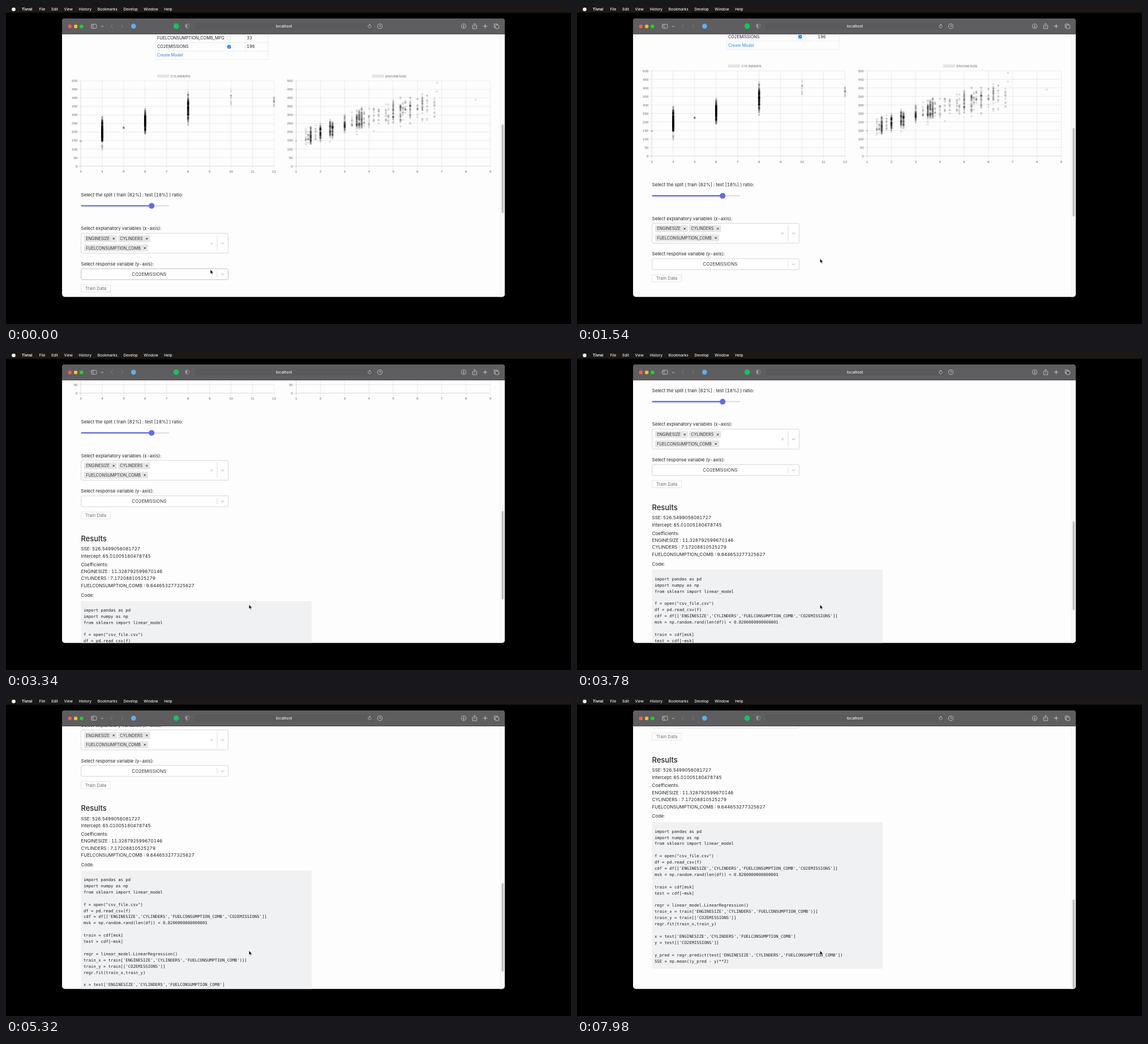
Animation of 998x561 px, one loop 8 s. Source, as an HTML page:

```html
<!DOCTYPE html>
<html lang="en">
<head>
<meta charset="utf-8">
<style>
  html, body { margin: 0; width: 100%; height: 100%; overflow: hidden; background: #000; }
  svg { display: block; width: 100%; height: 100%; font-family: Inter, sans-serif; font-variant-numeric: tabular-nums; }
  .chart { font-family: "Liberation Sans", Arial, sans-serif; }
  .code { font-family: "DejaVu Sans Mono", monospace; }
</style>
</head>
<body>
<svg id="stage" viewBox="0 0 998 561"></svg>
<script>
// y is the middle of the capitals
const text = (x, y, str, size = 8, fill = '#212529', more = '') =>
  `<text x="${x}" y="${y + size * 0.36}" font-size="${size}" fill="${fill}" ${more}>${str}</text>`;
const lines = (x, y, step, str, size, fill) =>
  str.split('\n').map((s, i) => text(x, y + i * step, s, size, fill)).join('');
const rect = (x, y, w, h, fill, more = '') =>
  `<rect x="${x}" y="${y}" width="${w}" height="${h}" fill="${fill}" ${more}/>`;
const line = (d, stroke, width = 0.8) =>
  `<path d="${d}" fill="none" stroke="${stroke}" stroke-width="${width}"/>`;
const dot = (x, y, r, fill) => `<circle cx="${x}" cy="${y}" r="${r}" fill="${fill}"/>`;
const cross = (x, y, r, color, width) =>
  line(`M${x - r} ${y - r}l${2 * r} ${2 * r}m0 ${-2 * r}l${-2 * r} ${2 * r}`, color, width);
const MID = 'text-anchor="middle"', END = 'text-anchor="end"';

let seed = 11;
const rnd = () => (seed = seed * 16807 % 2147483647) / 2147483647;

// n bell-shaped values around a mean, all at the same x
const column = (x, mean, spread, n) => Array.from({ length: n }, () =>
  [x, Math.round(mean + spread * (rnd() + rnd() + rnd() - 1.5) / 1.5)]);

const cylinders = [
  column(3, 146, 0, 2), column(4, 200, 108, 320), column(5, 226, 8, 6), column(6, 262, 98, 250),
  column(8, 338, 112, 200), column(10, 400, 95, 8), column(12, 382, 42, 12)
].flat();

const trend = x => 90 + 60 * x - 3 * x * x;
const bySize = (sizes, count) => sizes.flatMap(x => column(x, trend(x), 60 + 8 * x, count(x)));
const engines = [
  ...bySize([1.6, 2, 2.4, 2.5, 3, 3.5, 3.6, 3.7, 5, 5.3, 5.7, 6.2], x => 85 - 9 * x),
  ...bySize([1.4, 1.5, 1.8, 2, 3.3, 3.8, 4, 4.2, 4.4, 4.7, 4.8, 5.4, 5.5, 6, 6.4, 6.7], () => 12),
  [1, 148], [8.4, 389], [6.8, 488], [6.8, 437]
];

function chart(label, left, right, from, to, legend, points) {
  const step = (right - left) / (to - from);
  const X = v => left + (v - from) * step, Y = v => 282.4 - v * 0.3008;
  const shade = first => first ? 'rgba(0,0,0,.2)' : 'rgba(0,0,0,.1)';
  let out = rect(legend, 120.8, 21, 5.6, '#e5e5e5') + text(legend + 23.6, 123.6, label, 6.1, '#666');
  for (let v = 0; v <= 500; v += 50) {
    out += line(`M${left - 5} ${Y(v)}H${right}`, shade(v === 0), 0.7) + text(left - 5.8, Y(v), v, 6.1, '#666', END);
  }
  for (let v = from; v <= to; v++) {
    out += line(`M${X(v)} 132V287.4`, shade(v === from), 0.7) + text(X(v), 292, v, 6.1, '#666', MID);
  }
  const marks = points.map(([x, y]) => `<circle cx="${X(x)}" cy="${Y(y)}" r="1.6"/>`).join('');
  return `<g class="chart">${out}<g fill="rgba(0,0,0,.1)" stroke="rgba(0,0,0,.1)" stroke-width=".5">${marks}</g></g>`;
}

const tag = (x, y, w, label) => rect(x, y - 6, w, 12, '#e6e6e6', 'rx="1"')
  + text(x + 3.2, y, label, 7.15, '#333') + cross(x + w - 5.8, y, 1.5, '#222', 1);

const select = (y, h, id) => rect(132.6, y, 259.8, h, '#fff', `id="${id}" rx="2" stroke="#ccc" stroke-width=".8"`)
  + line(`M373 ${y + 4}v${h - 8}`, '#ccc', 0.7)
  + line(`M379.7 ${y + h / 2 - 1.3}l2.8 2.8l2.8 -2.8`, '#c4c4c4', 1.1);

const tableRow = (y, name, value, fill, stroke) => text(267, y, name, 7.27) + text(425.3, y, value, 7.27)
  + rect(391.2, y - 2.6, 5.6, 5.6, fill, `rx="1" stroke="${stroke}" stroke-width=".5"`)
  + line(`M392.4 ${y + 0.4}l1.2 1.4l2 -3`, '#fff', 0.9);

const table =
  line('M264.6 40V94.4H463.4V40M264.6 64.5H463.4M264.6 79.5H463.4M422.5 40V79.5M388.5 40V79.5', '#e4e7eb', 0.7)
  + tableRow(56.8, 'FUELCONSUMPTION_COMB_MPG', 33, '#fff', '#bbb')
  + tableRow(71.8, 'CO2EMISSIONS', 196, '#0b76ef', '#0b76ef')
  + text(267, 86.8, 'Create Model', 7.2, '#2a80e0');

const form =
  text(132.6, 332.7, 'Select the split ( train [82%] : test [18%] ) ratio:')
  + rect(132.5, 351.5, 156, 2, '#dcdcdc', 'rx="1"') + rect(132.5, 351.4, 125, 2.2, '#5f66d9', 'rx="1"')
  + dot(257.2, 352.6, 5.1, '#666cdd')
  + text(132.6, 392.5, 'Select explanatory variables (x-axis):')
  + select(401, 35, 'xs') + cross(363, 418.8, 2, '#c4c4c4', 1)
  + tag(138, 410.5, 58, 'ENGINESIZE') + tag(198, 410.5, 56.5, 'CYLINDERS') + tag(138, 427, 113, 'FUELCONSUMPTION_COMB')
  + text(132.6, 455.3, 'Select response variable (y-axis):')
  + select(463.6, 19.2, 'ys') + text(252.8, 473.3, 'CO2EMISSIONS', 8, '#333', MID)
  + rect(132.7, 492, 51.6, 12.6, '#fdfdfd', 'stroke="#dcdcdc" stroke-width=".7"')
  + text(158.5, 498.3, 'Train Data', 7.8, '#6c757d', MID);

const code = `import pandas as pd
import numpy as np
from sklearn import linear_model

f = open("csv_file.csv")
df = pd.read_csv(f)
cdf = df[['ENGINESIZE','CYLINDERS','FUELCONSUMPTION_COMB','CO2EMISSIONS']]
msk = np.random.rand(len(df)) &lt; 0.8200000000000001

train = cdf[msk]
test = cdf[~msk]

regr = linear_model.LinearRegression()
train_x = train['ENGINESIZE','CYLINDERS','FUELCONSUMPTION_COMB')}]
train_y = train[['CO2EMISSIONS']]
regr.fit(train_x,train_y)

x = test['ENGINESIZE','CYLINDERS','FUELCONSUMPTION_COMB']
y = test[['CO2EMISSIONS']]

y_pred = regr.predict(test['ENGINESIZE','CYLINDERS','FUELCONSUMPTION_COMB'])
SSE = np.mean((y_pred - y)**2)`;

const results =
  text(132.4, 539, 'Results', 13, '#212529', 'font-weight="500"')
  + lines(132.6, 557.4, 12.5, 'SSE: 526.5499056081727\nIntercept: 65.01005180478745')
  + lines(132.6, 584.6, 12.4, `Coefficients:
ENGINESIZE : 11.328792599670146
CYLINDERS : 7.17208810525279
FUELCONSUMPTION_COMB : 9.644653277325627`)
  + text(132.6, 638.6, 'Code:')
  + rect(132.5, 649, 407.5, 258.6, '#f0f1f3', 'rx="2"')
  + `<g class="code">${lines(137, 665, 10.9, code, 7.27, '#222')}</g>`;

const page = table
  + chart('CYLINDERS', 132, 473.4, 3, 12, 267, cylinders)
  + chart('ENGINESIZE', 512.5, 855.4, 1, 9, 646.7, engines)
  + form + results;

const menu = 'File Edit View History Bookmarks Develop Window Help'.split(' ')
  .map((s, i) => `<tspan dx="${i && 10.7}">${s}</tspan>`).join('');

const ICON = '#d2d1d3', DIM = '#858487';
const ring = x => line(`M${x + 4.1} 35.7a4.1 4.1 0 1 1 -8.2 0a4.1 4.1 0 1 1 8.2 0`, ICON);
const toolbar =
  rect(99, 22, 782, 28, '#5e5d5f') + rect(99, 49, 782, 0.8, '#454446')
  + ['#fe5f57', '#febc2e', '#28c840'].map((c, i) => dot(112.8 + i * 10.3, 36, 3.2, c)).join('')
  + rect(150.7, 32.2, 9.2, 7, 'none', `rx="1.2" stroke="${ICON}" stroke-width=".8"`)
  + line('M154 32.2v7M151.7 34h1.2M151.7 35.6h1.2', ICON, 0.7)
  + line('M168.2 35.2l1.8 1.7l1.8 -1.7', ICON, 0.9)
  + line('M188.4 32.2l-3.4 3.6l3.4 3.6M203.6 32.2l3.4 3.6l-3.4 3.6', DIM, 0.9)
  + dot(225.3, 35.6, 4.4, '#62aee8') + dot(300.6, 35.6, 4.9, '#17c264')
  + line('M320.2 31.6l3.4 1.2v3q-.4 2.6 -3.4 4q-3 -1.4 -3.4 -4v-3z', '#98979a', 0.7)
  + '<path d="M320.2 31.6v8.2q-3 -1.4 -3.4 -4v-3z" fill="#98979a"/>'
  + rect(332.5, 28.5, 317.5, 14.4, '#5a595b', 'rx="3" stroke="#686769" stroke-width=".5"')
  + text(491, 35.9, 'localhost', 6.6, '#f2f2f2', MID + ' font-weight="500"')
  + line('M644.9 35a2.7 2.7 0 1 1 -1.2 -1.5M642.3 31.6l1.7 1.8l-1.9 1.4', ICON)
  + ring(660.4) + line('M660.4 33v3h2', ICON)
  + ring(808.5) + line('M808.5 33.2v4.6M806.7 36.2l1.8 1.8l1.8 -1.8', ICON)
  + line('M826 34h-1.8v6h7.2v-6h-1.8M827.8 37.4v-6.4M825.9 32.6l1.9 -1.9l1.9 1.9', ICON)
  + line('M846.4 31.8v7.6M842.6 35.6h7.6', ICON, 0.9)
  + line('M862.3 31.8h6v1.8M862.3 31.8v6h1.8', ICON)
  + rect(864.2, 33.7, 6.4, 6.2, 'none', `rx="1" stroke="${ICON}" stroke-width=".8"`);

const stage = document.getElementById('stage');
stage.innerHTML =
  '<clipPath id="win"><rect x="99" y="22" width="782" height="491.3" rx="5"/></clipPath>'
  + rect(0, 0, 998, 561, '#000') + rect(0, 0, 998, 11.8, '#1b1816')
  + dot(13.5, 6, 3.3, '#f4f4f4')
  + text(27.7, 6, 'Tivral', 6.7, '#f4f4f4', 'font-weight="700"')
  + text(58.5, 6, menu, 6.5, '#f0f0f0', 'font-weight="500"')
  + '<g clip-path="url(#win)">' + rect(99, 22, 782, 492, '#fdfdfd')
  + `<g id="page">${page}</g>`
  + rect(873, 49, 8, 465, '#fafafa') + line('M873.2 49V514', '#e6e6e6', 0.6)
  + rect(875.4, 209, 4, 156.5, '#c0c0c0', 'id="thumb" rx="2"')
  + toolbar + '</g>'
  + '<path id="cursor" d="M0 0v7.6l1.8 -1.6l1.2 2.8l1.3 -.6l-1.2 -2.6h2.4z" fill="#000" stroke="#fff" stroke-width=".6"/>';

const [pageEl, thumb, cursor, ys] = ['page', 'thumb', 'cursor', 'ys'].map(id => document.getElementById(id));

// scroll flicks: start, end, distance
const flicks = [[1260, 1660, 19], [1800, 2640, 47], [2780, 3920, 200], [4320, 5460, 79], [5600, 6320, 85]];
const part = (t, a, b) => Math.min(1, Math.max(0, (t - a) / (b - a)));
const glide = p => 1 - (1 - p ** 1.5) ** 3;

function draw(now) {
  const t = now % 8000;
  const scroll = flicks.reduce((sum, [a, b, d]) => sum + d * glide(part(t, a, b)), 0);
  pageEl.setAttribute('transform', `translate(0 ${-scroll})`);
  thumb.setAttribute('y', 209 + scroll * 0.34);
  const p = part(t, 120, 820), k = p * p * (3 - 2 * p);
  const y = 465 - 19.3 * k;
  cursor.setAttribute('transform', `translate(${361 + 68.2 * k} ${y})`);
  ys.setAttribute('stroke', y > 463.6 ? '#b0b0b0' : '#ccc');
  requestAnimationFrame(draw);
}
requestAnimationFrame(draw);
</script>
</body>
</html>
```
